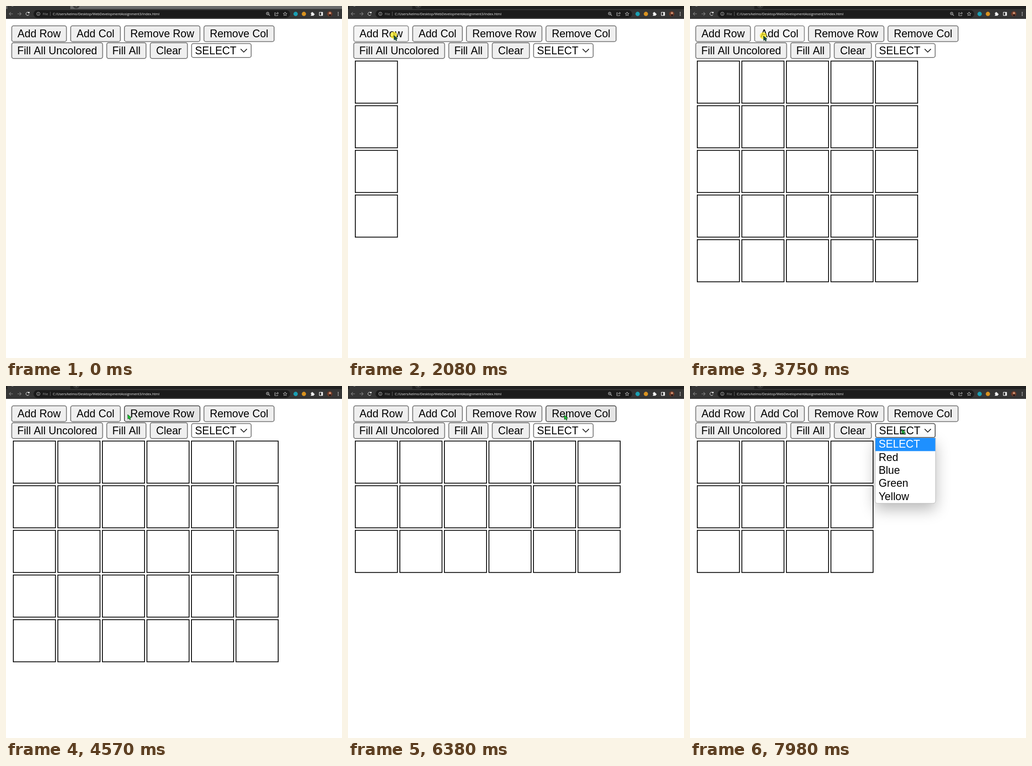
Animation of 732 by 765 pixels, one loop 8000 ms. Source, as an HTML page with a canvas:

```html
<!DOCTYPE html>
<html lang="en">
<head>
<meta charset="utf-8">
<title>Grid maker</title>
<style>
  html, body { margin: 0; width: 100%; height: 100%; overflow: hidden; background: #fff; }
  canvas { display: block; }
</style>
</head>
<body>
<canvas id="stage" width="732" height="765"></canvas>
<script>
const ctx = document.getElementById('stage').getContext('2d');
const LOOP = 8000;
const FONT = '23.2px "Liberation Sans", Arial, sans-serif';
const UI_FONT = '7.4px "Open Sans", "Noto Sans", sans-serif';

// label, left, right, top, bottom
const BUTTONS = [
  ['Add Row', 11.6, 132.6, 42.3, 78.3],
  ['Add Col', 140, 250, 42.3, 78.3],
  ['Remove Row', 257.2, 423.4, 42.3, 78.3],
  ['Remove Col', 430.4, 585, 42.3, 78.3],
  ['Fill All Uncolored', 11.6, 211.4, 79, 115],
  ['Fill All', 218.6, 306, 79, 115],
  ['Clear', 313.4, 396.2, 79, 115]
];
const SELECT = [403.4, 535, 80.8, 112.8];
const OPTIONS = ['SELECT', 'Red', 'Blue', 'Green', 'Yellow'];
const HOLD = 70;      // press to release
const OPEN_AT = 7850;

// press time, rows and columns after the release
const CLICKS = [
  [1150, 1, 1], [1420, 2, 1], [1690, 3, 1], [1880, 4, 1], [2080, 5, 1],
  [2820, 5, 2], [3010, 5, 3], [3270, 5, 4], [3540, 5, 5], [3750, 5, 6],
  [5570, 4, 6], [5840, 3, 6], [6510, 3, 5], [6710, 3, 4], [7780, 3, 4]
];

// start, end, target x, y
const MOVES = [
  [320, 1080, 100, 64], [2220, 2490, 156, 65], [2500, 2560, 160, 65],
  [3880, 4500, 265, 62], [4970, 5240, 322, 66], [5960, 6380, 471, 63],
  [7450, 7720, 461.5, 94]
];

const clamp = v => Math.max(0, Math.min(1, v));
const ease = v => v * v * (3 - 2 * v);
const mix = (a, b, k) => a + (b - a) * k;

function pointer(t) {
  let x = 635, y = 657;
  for (const [from, to, tx, ty] of MOVES) {
    const k = ease(clamp((t - from) / (to - from)));
    x = mix(x, tx, k);
    y = mix(y, ty, k);
  }
  return { x, y };
}

function box(l, r, top, bottom, fill, stroke, radius, width) {
  const h = width / 2;
  ctx.beginPath();
  ctx.roundRect(l + h, top + h, r - l - width, bottom - top - width, radius);
  ctx.fillStyle = fill;
  ctx.fill();
  ctx.strokeStyle = stroke;
  ctx.lineWidth = width;
  ctx.stroke();
}

function disc(x, y, r, color) {
  ctx.fillStyle = color;
  ctx.beginPath();
  ctx.arc(x, y, r, 0, 7);
  ctx.fill();
}

function line(color, width, ...pts) {
  ctx.strokeStyle = color;
  ctx.lineWidth = width;
  ctx.beginPath();
  for (let i = 0; i < pts.length; i += 2) ctx.lineTo(pts[i], pts[i + 1]);
  ctx.stroke();
}

function ring(x, y, r, color, from = 0, to = 2 * Math.PI) {
  ctx.strokeStyle = color;
  ctx.lineWidth = 1;
  ctx.beginPath();
  ctx.arc(x, y, r, from, to);
  ctx.stroke();
}

function text(str, x, y, color, font = FONT, align = 'left') {
  ctx.font = font;
  ctx.textAlign = align;
  ctx.fillStyle = color;
  ctx.fillText(str, x, y);
}

function arrowIcon(x, dir, color) {
  line(color, 1.1, x - 4 * dir, 17, x + 4 * dir, 17);
  line(color, 1.1, x + 0.5 * dir, 13.5, x + 4 * dir, 17, x + 0.5 * dir, 20.5);
}

function star(x, y) {
  const pts = [];
  for (let i = 0; i <= 10; i++) {
    const r = i % 2 ? 1.9 : 4.4, a = i * Math.PI / 5 - Math.PI / 2;
    pts.push(x + r * Math.cos(a), y + r * Math.sin(a));
  }
  line('#c8c8c8', 0.9, ...pts);
}

function browserBar(focused) {
  ctx.fillStyle = focused ? '#202020' : '#6b6b6b';
  ctx.fillRect(0, 0, 732, 7);
  ctx.fillStyle = '#353535';
  ctx.beginPath();
  ctx.roundRect(3, -6, 137, 16, 4);
  ctx.fill();
  ctx.fillRect(0, 6.5, 732, 21.5);
  disc(14, -2, 3, '#999');
  disc(153, -2, 7.5, focused ? '#353535' : '#3c3c3c');
  line('#aaa', 1, 153, 0, 153, 1.5);

  arrowIcon(11, -1, '#858585');
  arrowIcon(29, 1, '#858585');
  ring(47, 17, 3.6, '#f0f0f0', 0.4, 5.4);
  ctx.fillStyle = '#f0f0f0';
  ctx.fillRect(48.3, 12.8, 3, 3);

  ctx.fillStyle = '#1b1b1b';
  ctx.beginPath();
  ctx.roundRect(60, 9, 559, 16.5, 8.2);
  ctx.fill();
  ring(70.5, 17, 3.6, '#b5b5b5');
  line('#b5b5b5', 1, 70.5, 16.4, 70.5, 19);
  line('#b5b5b5', 1, 70.5, 14.6, 70.5, 15.5);
  text('File', 80, 19.8, '#9c9c9c', UI_FONT);
  line('#666', 1, 96.5, 12.5, 96.5, 21.5);
  text('C:/Users/kelmo/Desktop/WebDevelopmentAssignment3/index.html', 102, 19.8, '#f2f2f2', UI_FONT);

  ring(570, 16.3, 2.9, '#c8c8c8');
  line('#c8c8c8', 1.1, 572.2, 18.5, 575, 21.2);
  line('#c8c8c8', 0.8, 568.6, 16.3, 571.4, 16.3);
  line('#c8c8c8', 0.8, 570, 14.9, 570, 17.7);
  line('#c8c8c8', 0.9, 587.5, 14.5, 585.5, 14.5, 585.5, 21, 592, 21, 592, 19);
  line('#c8c8c8', 0.9, 587.5, 18.5, 588.5, 16, 593, 15.5);
  line('#c8c8c8', 0.9, 591, 13, 593.5, 15.5, 591, 18);
  star(608, 17.4);

  disc(631, 17.2, 4.7, '#1b9fb2');
  disc(649, 17.2, 4.6, '#d9921f');
  ctx.fillStyle = '#f0f0f0';
  ctx.fillRect(664.2, 14.8, 6.2, 6.4);
  disc(667.2, 14.4, 1.5, '#f0f0f0');
  disc(670.8, 18, 1.5, '#f0f0f0');
  disc(664.2, 18.2, 1.1, '#353535');
  box(682, 690.4, 13, 21.3, '#353535', '#f0f0f0', 0.5, 1.2);
  ctx.fillStyle = '#f0f0f0';
  ctx.fillRect(686.8, 13.4, 3.2, 7.6);

  disc(705.3, 17, 5.8, '#6d3a28');
  disc(705.8, 15.5, 2.5, '#c98f70');
  disc(706, 20, 2.3, '#2a1b1c');
  for (let i = -1; i <= 1; i++) disc(723.7, 17.2 + i * 3.2, 0.95, '#e8e8e8');
}

function controls(p, active, pressed) {
  const over = (l, r, top, bottom) =>
    active && p.x >= l && p.x <= r && p.y >= top && p.y <= bottom;

  for (const [label, ...b] of BUTTONS) {
    let fill = '#efefef', edge = '#767676';
    if (over(...b)) {
      fill = pressed ? '#f5f5f5' : '#e5e5e5';
      edge = pressed ? '#8d8d8d' : '#4f4f4f';
    }
    box(...b, fill, edge, 4, 1.8);
    text(label, (b[0] + b[1]) / 2, (b[2] + b[3]) / 2 + 8, '#000', FONT, 'center');
  }
  box(...SELECT, '#fff', over(...SELECT) ? '#4f4f4f' : '#767676', 4, 1.8);
  text('SELECT', 411.8, 104.8, '#000');
  line('#000', 1.5, 511.2, 93.4, 518, 100.2, 524.8, 93.4);
}

function grid(rows, cols) {
  ctx.strokeStyle = '#000';
  ctx.lineWidth = 1.8;
  for (let r = 0; r < rows; r++)
    for (let c = 0; c < cols; c++)
      ctx.strokeRect(15.9 + c * 97.05, 119.6 + r * 97.05, 91.8, 91.6);
}

function dropdown() {
  const [l, r] = SELECT, top = 113, h = 142;
  const shape = () => {
    ctx.beginPath();
    ctx.roundRect(l, top, r - l, h, [0, 0, 5, 5]);
  };
  ctx.save();
  ctx.shadowColor = 'rgba(0,0,0,.28)';
  ctx.shadowBlur = 32;
  ctx.shadowOffsetY = 13;
  ctx.fillStyle = '#fff';
  shape();
  ctx.fill();
  ctx.restore();
  ctx.strokeStyle = '#b8b8b8';
  ctx.lineWidth = 1;
  shape();
  ctx.stroke();
  ctx.fillStyle = '#1e90ff';
  ctx.fillRect(l + 0.6, top, r - l - 1.2, 28.5);
  OPTIONS.forEach((o, i) => text(o, 411, 134.4 + i * 28.3, i ? '#000' : '#fff'));
}

function drawPointer({ x, y }, sincePress) {
  if (sincePress < 110) {
    const glow = 1 - 0.6 * clamp((sincePress - HOLD) / 40);
    disc(x - 0.5, y - 0.5, 7.5, `rgba(255,235,30,${0.75 * glow})`);
  }
  const k = clamp(sincePress / 260);
  ctx.fillStyle = `rgb(28,${mix(75, 200, k)},${mix(70, 50, k)})`;
  ctx.strokeStyle = '#123c1c';
  ctx.lineWidth = 0.9;
  ctx.beginPath();
  [[0, 0], [0.5, 10], [2.8, 8], [4.8, 11.5], [6.4, 10.6], [4.8, 7.4], [8, 6.8]]
    .forEach(([dx, dy]) => ctx.lineTo(x + dx, y + dy));
  ctx.closePath();
  ctx.fill();
  ctx.stroke();
}

function draw(t) {
  let rows = 0, cols = 0, lastPress = -1000;
  for (const [at, r, c] of CLICKS) {
    if (t >= at) lastPress = at;
    if (t >= at + HOLD) [rows, cols] = [r, c];
  }
  const p = pointer(t), active = t >= 320, since = t - lastPress;

  ctx.fillStyle = '#fff';
  ctx.fillRect(0, 0, 732, 765);
  browserBar(t >= 1150);
  controls(p, active, since < HOLD);
  grid(rows, cols);
  if (t >= OPEN_AT) dropdown();
  if (active) drawPointer(p, since);
}

const start = performance.now();
function tick() {
  draw((performance.now() - start) % LOOP);
  requestAnimationFrame(tick);
}
tick();
</script>
</body>
</html>
```
